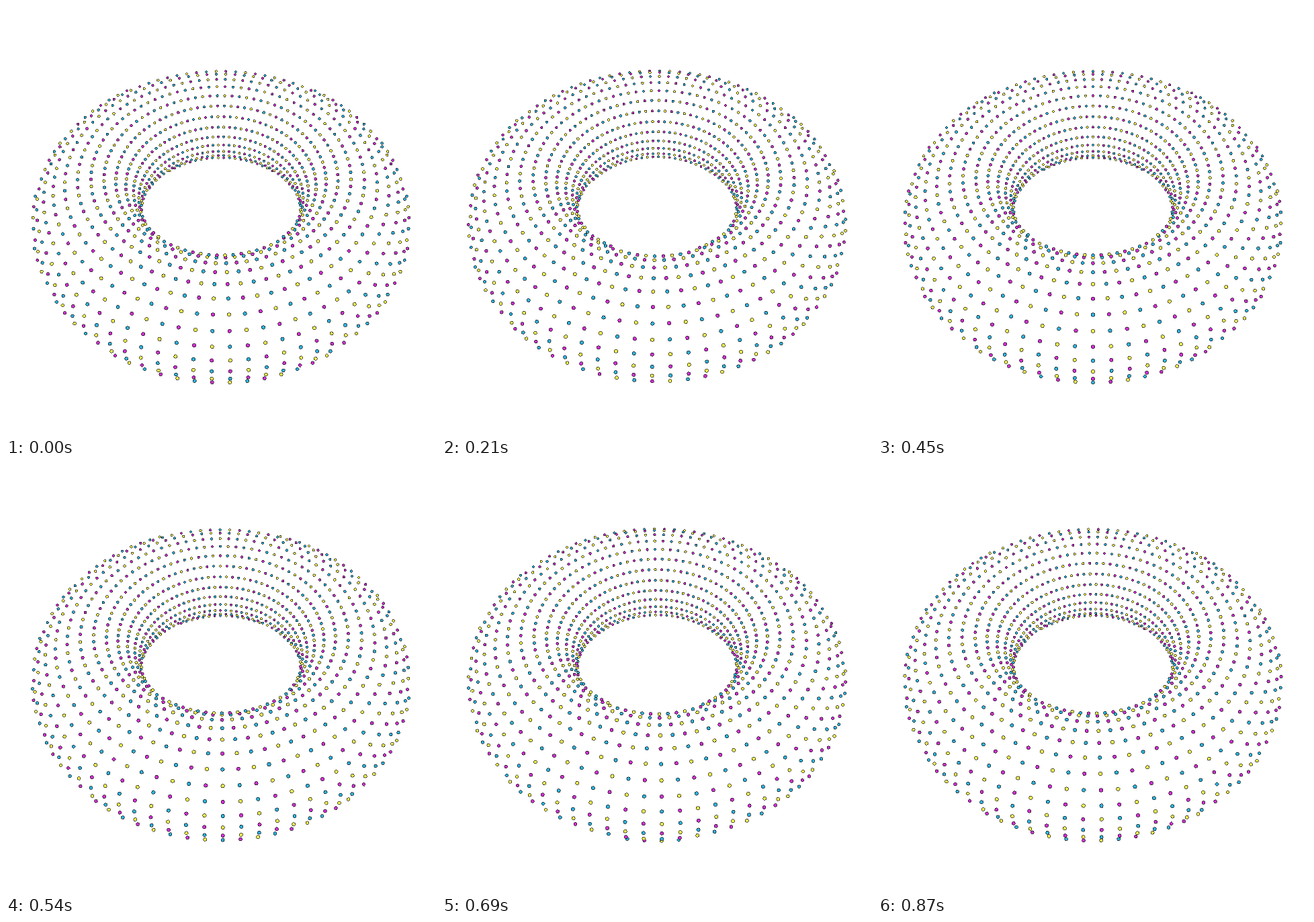
These frames come from a looping animation (640x640 px, 0.9 s). An HTML page without scripts:

```html
<!DOCTYPE html>
<html lang="en">
<head>
<meta charset="utf-8">
<title>Dotted torus</title>
<style>
@property --t { syntax: "<number>"; inherits: true; initial-value: 0 }
@property --cos-v { syntax: "<number>"; inherits: true; initial-value: 0 }
@property --sin-v { syntax: "<number>"; inherits: true; initial-value: 0 }
@property --cos-u { syntax: "<number>"; inherits: true; initial-value: 0 }
@property --rho { syntax: "<number>"; inherits: true; initial-value: 0 }
@property --zoom { syntax: "<number>"; inherits: true; initial-value: 0 }
@property --facing { syntax: "<number>"; inherits: true; initial-value: 0 }

html, body { margin: 0; width: 100%; height: 100%; overflow: hidden; background: #fff }
svg { display: block; width: 640px; height: 640px; animation: roll 900ms steps(30) infinite }
@keyframes roll { from { --t: 0 } to { --t: 1 } }

/* v: angle around the tube, 28 rows, two rows per loop */
.row {
  --v: calc((var(--j) + 2 * var(--t)) * 360deg / 28 + 2.2deg);
  --cos-v: cos(var(--v));
  --sin-v: sin(var(--v));
  --rho: calc(2.5893 + cos(var(--v)));
}

/* u: angle around the axis, 84 columns, one column per loop */
circle {
  --u: calc((var(--a) + 3 * var(--b) + 21 * var(--c) - var(--j) - .5 + var(--t)) * 360deg / 84);
  --cos-u: cos(var(--u));
  --zoom: calc(628 / (8.4536 - .6169 * var(--rho) * var(--cos-u) - .787 * var(--sin-v)));
  --facing: calc(var(--cos-v) * (5.591 * var(--cos-u) - 2.589) + 6.3585 * var(--sin-v) - 1);
  cx: calc(320px + 1px * var(--zoom) * var(--rho) * sin(var(--u)));
  cy: calc(320px + 1px * var(--zoom) * (.787 * var(--rho) * var(--cos-u) - .6169 * var(--sin-v) - .4778));
  r: calc(.0255px * var(--zoom) * clamp(0, var(--facing) * 999, 1));
  stroke: #111;
  stroke-width: .7px;
  shape-rendering: crispEdges;
}
.yellow { --a: 0; fill: #f6f34f }
.cyan { --a: 1; fill: #2cb3dd }
.magenta { --a: 2; fill: #d42fd4 }
</style>
</head>
<body>
<svg viewBox="0 0 640 640">
  <defs>
    <g id="trio">
      <circle class="yellow"/>
      <circle class="cyan"/>
      <circle class="magenta"/>
    </g>
    <g id="arc">
      <use href="#trio" style="--b:0"/>
      <use href="#trio" style="--b:1"/>
      <use href="#trio" style="--b:2"/>
      <use href="#trio" style="--b:3"/>
      <use href="#trio" style="--b:4"/>
      <use href="#trio" style="--b:5"/>
      <use href="#trio" style="--b:6"/>
    </g>
    <g id="ring">
      <use href="#arc" style="--c:0"/>
      <use href="#arc" style="--c:1"/>
      <use href="#arc" style="--c:2"/>
      <use href="#arc" style="--c:3"/>
    </g>
  </defs>
  <use class="row" href="#ring" style="--j:-3"/>
  <use class="row" href="#ring" style="--j:-2"/>
  <use class="row" href="#ring" style="--j:-1"/>
  <use class="row" href="#ring" style="--j:0"/>
  <use class="row" href="#ring" style="--j:1"/>
  <use class="row" href="#ring" style="--j:2"/>
  <use class="row" href="#ring" style="--j:3"/>
  <use class="row" href="#ring" style="--j:4"/>
  <use class="row" href="#ring" style="--j:5"/>
  <use class="row" href="#ring" style="--j:6"/>
  <use class="row" href="#ring" style="--j:7"/>
  <use class="row" href="#ring" style="--j:8"/>
  <use class="row" href="#ring" style="--j:9"/>
  <use class="row" href="#ring" style="--j:10"/>
  <use class="row" href="#ring" style="--j:11"/>
  <use class="row" href="#ring" style="--j:12"/>
  <use class="row" href="#ring" style="--j:13"/>
  <use class="row" href="#ring" style="--j:14"/>
  <use class="row" href="#ring" style="--j:15"/>
  <use class="row" href="#ring" style="--j:16"/>
  <use class="row" href="#ring" style="--j:17"/>
</svg>
</body>
</html>
```
